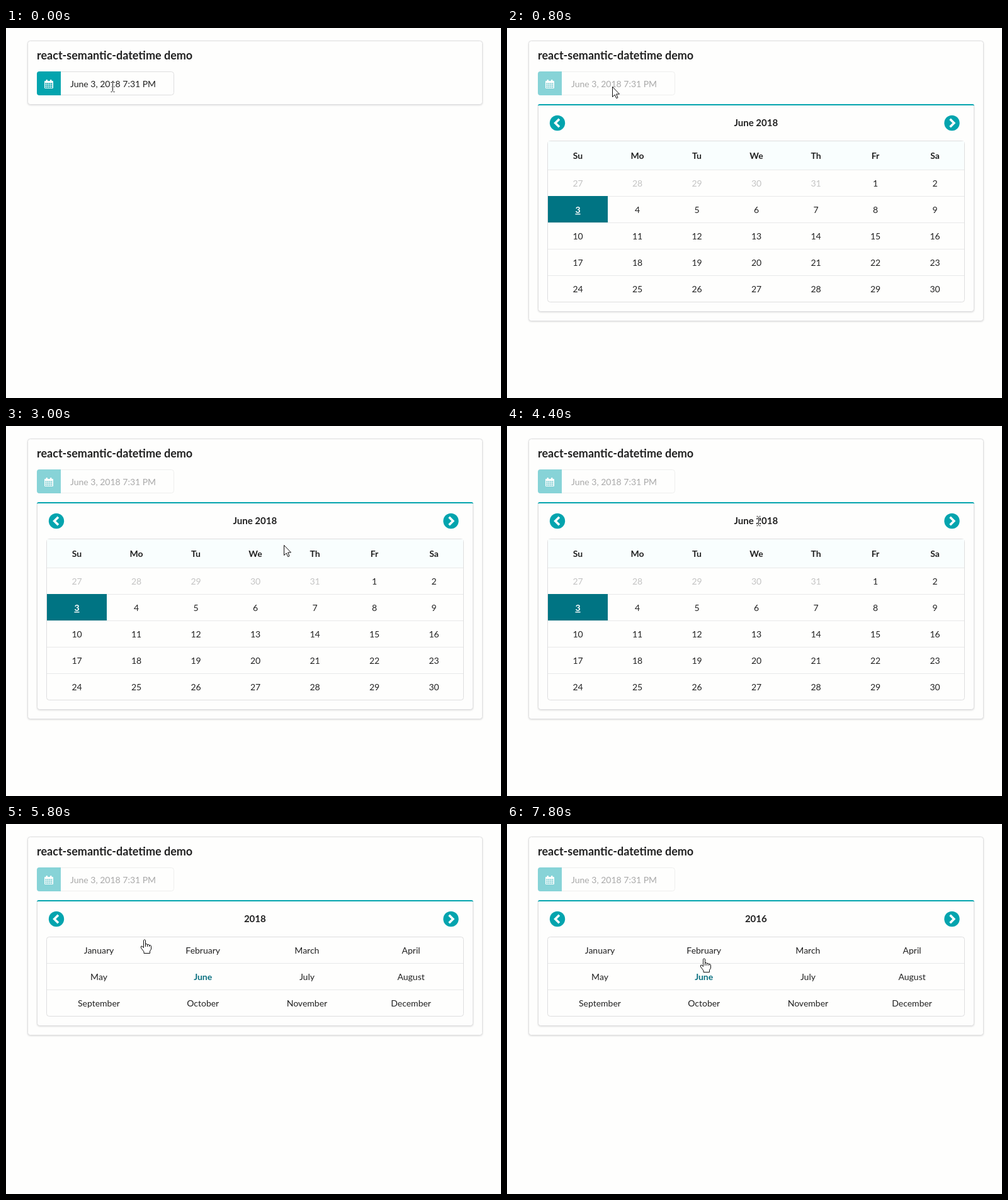
An HTML page for the animation above (8000 ms loop, 786 by 588 pixels).

```html
<!DOCTYPE html>
<html lang="en">
<head>
<meta charset="utf-8">
<title>Date picker demo</title>
<style>
  html, body { margin: 0; width: 100%; height: 100%; overflow: hidden; background: #fefefd; }
  svg { display: block; width: 786px; height: 588px; font: 14px Lato, sans-serif; }
  text { fill: #212121; }
  .middle { text-anchor: middle; }
  .bold { font-weight: 700; }
  .muted { fill: #c3c3c3; }
  .month { fill: #0a7080; font-weight: 700; }
  .selected { fill: #fff; font-weight: 700; text-decoration: underline; }
  .box { fill: #fefefd; stroke: #dededf; }
  .shadow { filter: drop-shadow(0 1px 1px rgba(34, 36, 38, .15)); }
  .line { stroke: #e8e9e9; }
  .teal { fill: #03a4ae; }
  .cursor { fill: #fff; stroke: #111; stroke-linejoin: round; }
</style>
</head>
<body>
<svg id="stage" viewBox="0 0 786 588"></svg>
<script>
const LOOP = 8000, STEP = 200;
const OPEN_AT = 800, MONTHS_AT = 4600;
const YEAR_CHANGES = [6800, 7400];
const DAYS = ['Su', 'Mo', 'Tu', 'We', 'Th', 'Fr', 'Sa'];
const MONTHS = ['January', 'February', 'March', 'April', 'May', 'June', 'July',
  'August', 'September', 'October', 'November', 'December'];

// time, x, y, cursor shape from that time on
const TRACK = [
  [0, 169, 94, 'beam'], [400, 167, 93, 'beam'], [800, 167, 93, 'arrow'],
  [1400, 167, 93, 'arrow'], [1800, 230, 196, 'arrow'], [2600, 526, 233, 'arrow'],
  [2800, 488, 208, 'arrow'], [3000, 441, 189, 'arrow'], [3800, 404, 160, 'arrow'],
  [4000, 399, 151, 'beam'], [5000, 399, 151, 'beam'], [5200, 372, 164, 'arrow'],
  [5600, 275, 190, 'hand'], [6000, 165, 176, 'arrow'], [6400, 90, 151, 'hand'],
  [6600, 87, 148, 'hand'], [7400, 87, 148, 'hand'], [7800, 313, 213, 'hand'],
  [8000, 313, 213, 'hand']
];

const SHAPES = {
  arrow: '<path class="cursor" d="M.5 .5V16.5L4.2 13L6.7 18.7L9 17.7L6.6 12H11.5Z"/>',
  beam: ['stroke="#fff" stroke-width="3"', 'stroke="#111"'].map(style =>
    `<path fill="none" ${style} d="M-2.5 -7.5H-.5M1.5 -7.5H3.5M.5 -6.5V6.5M-2.5 7.5H-.5M1.5 7.5H3.5"/>`).join(''),
  hand: `<path class="cursor" d="M-1.5 2Q0 -1 1.5 2V8Q3 6.5 4.5 8.5Q6 7.5 7.5 9.5Q10.5 9 10.5 12
    V16L8.5 19V22.5H-1V20L-5.5 14Q-6.5 10.5 -4 11L-1.5 13.5Z"/>
    <path class="cursor" d="M1.5 8V12M4.5 8.5V12M7.5 9.5V12"/>`
};

const text = (x, y, label, cls = '', attrs = '') =>
  `<text x="${x}" y="${y}" class="${cls}" ${attrs}>${label}</text>`;
const rect = (x, y, w, h, cls = '', attrs = '') =>
  `<rect x="${x}" y="${y}" width="${w}" height="${h}" class="${cls}" ${attrs}/>`;
const rowLine = y => `<path class="line" d="M65 ${y}H726"/>`;

function calendarIcon() {
  let icon = rect(61, 84, 14, 12, '', 'rx="1" fill="#fff"');
  for (let i = 0; i < 12; i++)
    icon += rect(62.2 + i % 4 * 3, 87.4 + Math.floor(i / 4) * 2.8, 2.3, 2, 'teal');
  for (const x of [63.5, 70])
    icon += rect(x, 82, 2.5, 4, '', 'rx="1" fill="#fff"');
  return icon;
}

function field(disabled) {
  return `<path d="M87 69.5H262.5a4 4 0 0 1 4 4V102.5a4 4 0 0 1 -4 4H87"
      fill="none" stroke="${disabled ? '#eeefee' : '#dededf'}"/>
    <g opacity="${disabled ? .47 : 1}">
      <path class="teal" d="M87 69H53a4 4 0 0 0 -4 4V103a4 4 0 0 0 4 4H87Z"/>
      ${calendarIcon()}</g>` +
    text(102, 94, 'June 3, 2018 7:31 PM', '', disabled ? 'style="fill:#a9a9a9"' : '');
}

const arrowButton = (x, dir) =>
  `<circle class="teal" cx="${x}" cy="151" r="12.2"/>
   <path d="M${x - 3 * dir} 144.7L${x + 3.3 * dir} 151L${x - 3 * dir} 157.3"
     fill="none" stroke="#fff" stroke-width="3.6"/>`;

function dayGrid() {
  const columnX = i => 112.5 + 94.5 * i;
  let grid = rect(65, 180, 661, 45, '', 'fill="#f9fefe"');
  DAYS.forEach((day, i) => grid += text(columnX(i), 208, day, 'middle bold'));
  for (let row = 0; row < 5; row++) grid += rowLine(225.5 + 42 * row);
  grid += rect(65, 267, 95, 42, '', 'fill="#007483"');
  for (let i = 0; i < 35; i++) {
    const outside = i < 4 + 1, day = outside ? 27 + i : i - 4;
    const cls = outside ? 'muted' : day === 3 ? 'selected' : '';
    grid += text(columnX(i % 7), 252 + 42 * Math.floor(i / 7), day, 'middle ' + cls);
  }
  return grid;
}

function monthGrid() {
  let grid = rowLine(221.5) + rowLine(263.5);
  MONTHS.forEach((name, i) => grid += text(147.5 + 165.2 * (i % 4),
    206 + 42 * Math.floor(i / 4), name, 'middle ' + (name === 'June' ? 'month' : '')));
  return grid;
}

function panel(time) {
  const months = time >= MONTHS_AT, bottom = months ? 305.5 : 435.5;
  const year = 2018 - YEAR_CHANGES.filter(change => time >= change).length;
  return rect(49.5, 121.5, 692, bottom - 106.5, 'box shadow', 'rx="4"') +
    '<path class="teal" d="M49 124Q49 121 52 121H739Q742 121 742 124L741 123H50Z"/>' +
    arrowButton(80, -1) + arrowButton(706.5, 1) +
    text(395.3, 156, months ? year : 'June ' + year, 'middle bold', 'font-size="15"') +
    rect(64.5, 179.5, 662, bottom - 179.5, 'box', 'rx="4"') +
    (months ? monthGrid() : dayGrid());
}

function cursor(time) {
  const next = TRACK.findIndex(key => key[0] > time);
  const [t0, x0, y0, shape] = TRACK[next - 1], [t1, x1, y1] = TRACK[next];
  const part = (time - t0) / (t1 - t0);
  const x = Math.round(x0 + (x1 - x0) * part), y = Math.round(y0 + (y1 - y0) * part);
  return `<g transform="translate(${x} ${y})">${SHAPES[shape]}</g>`;
}

function scene(time) {
  const open = time >= OPEN_AT;
  const bottom = !open ? 121.5 : time < MONTHS_AT ? 465.5 : 335.5;
  return rect(34.5, 20.5, 722, bottom - 20.5, 'box shadow', 'rx="4"') +
    text(49, 50, 'react-semantic-datetime demo', 'bold', 'font-size="18"') +
    field(open) + (open ? panel(time) : '') + cursor(time);
}

const stage = document.getElementById('stage');
let shown = -1;
function frame() {
  const time = Math.floor(performance.now() % LOOP / STEP) * STEP;
  if (time !== shown) stage.innerHTML = scene(shown = time);
  requestAnimationFrame(frame);
}
frame();
</script>
</body>
</html>
```
